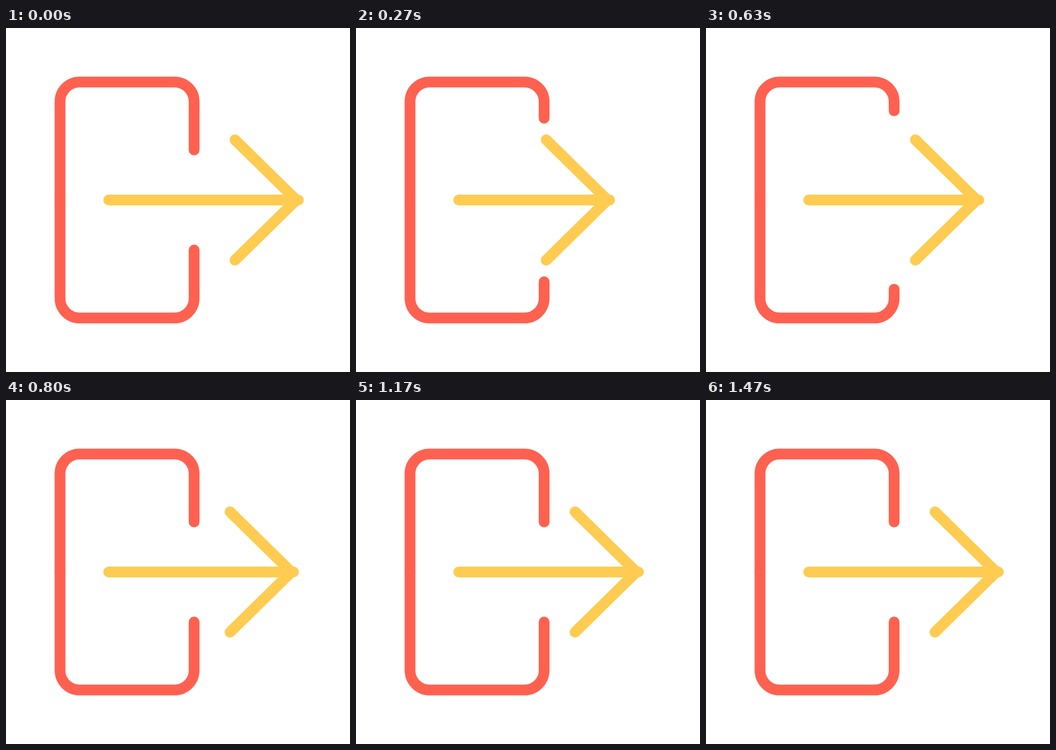
These frames come from a looping animation (640 by 640 pixels, 2000 ms). An HTML page without scripts:

```html
<!DOCTYPE html>
<html lang="en">
<head>
<meta charset="utf-8">
<title>Exit arrow</title>
<style>
  @property --frame {
    syntax: "<number>";
    inherits: true;
    initial-value: 0;
  }

  html, body {
    margin: 0;
    width: 100%;
    height: 100%;
    overflow: hidden;
    background: #fff;
  }

  /* 30 frames per second; each phase eases from 0 to 1 over its span of frames */
  svg {
    display: block;
    width: 100%;
    height: 100%;
    fill: none;
    stroke-width: 20;
    stroke-linecap: round;
    stroke-linejoin: round;
    animation: tick 2s steps(60, end) -4ms infinite;

    --pull: calc(.5 - .5 * cos(180deg * clamp(0, var(--frame) / 14, 1)));
    --open: calc(.5 - .5 * cos(180deg * clamp(0, (var(--frame) - 5) / 9, 1)));
    --release: calc(.5 - .5 * cos(180deg * clamp(0, (var(--frame) - 14) / 8, 1)));
    --recoil: calc(.5 - .5 * cos(180deg * clamp(0, (var(--frame) - 22) / 7.5, 1)));
    --rebound: calc(.5 - .5 * cos(180deg * clamp(0, (var(--frame) - 29.5) / 9.5, 1)));
    --settle: calc(.5 - .5 * cos(180deg * clamp(0, (var(--frame) - 39) / 5, 1)));

    --retreat: calc(118 * (var(--pull) - var(--release))
      + 55.5 * var(--recoil) - 59.5 * var(--rebound) + 4 * var(--settle));
    --trim: calc(237 * (var(--open) - var(--release)));
  }

  @keyframes tick {
    from { --frame: 0; }
    to { --frame: 60; }
  }

  .door {
    stroke: #ff6150;
    stroke-dasharray: 564.2 600;
    stroke-dashoffset: calc(var(--trim) * 1px);
  }

  .arrow { stroke: #ffcb50; }

  .shaft, .head { transform: translateX(calc(var(--retreat) * -1px)); }

  /* the shaft slides with the head while its tail stays put */
  .shaft {
    stroke-dasharray: 353 600;
    stroke-dashoffset: calc(var(--retreat) * 1px);
    transform: none;
  }
</style>
</head>
<body>
<svg viewBox="0 0 640 640">
  <defs>
    <path id="half" d="M100.5 320V137A36.5 36.5 0 0 1 137 100.5H313.5A36.5 36.5 0 0 1 350 137V227"/>
  </defs>
  <g class="door">
    <use href="#half"/>
    <use href="#half" transform="matrix(1 0 0 -1 0 640)"/>
  </g>
  <g class="arrow">
    <path class="shaft" d="M191 320H544"/>
    <path class="head" d="M426 208L540 320L426 432"/>
  </g>
</svg>
</body>
</html>
```
